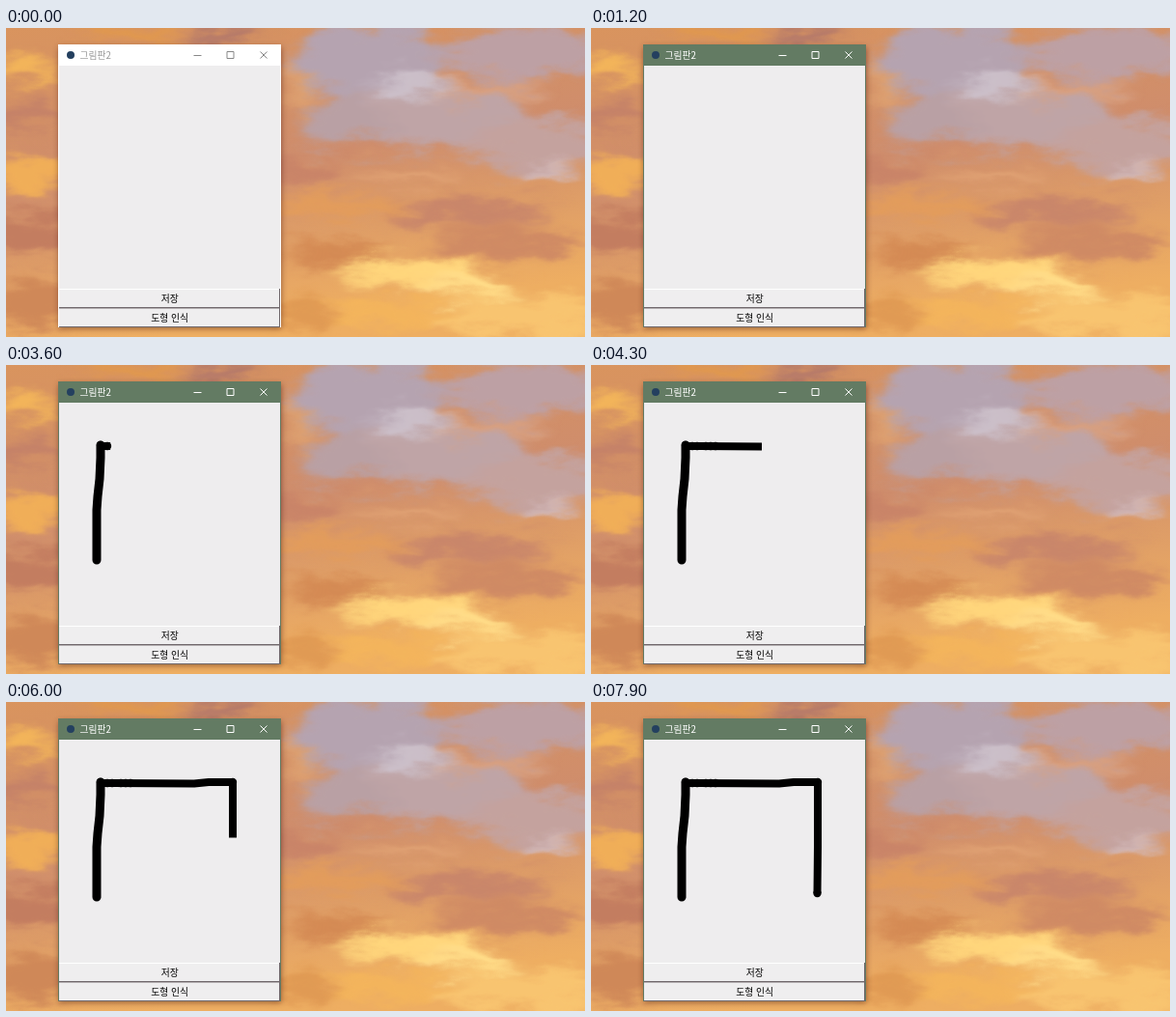
An HTML page that plays this animation: 600x320 px, repeating every 8 s.

```html
<!DOCTYPE html>
<html lang="ko">
<head>
<meta charset="utf-8">
<style>
  html, body { margin: 0; width: 100%; height: 100%; overflow: hidden; }
  svg { display: block; width: 600px; height: 320px; }
  text { font: 9.8px "Noto Sans CJK KR", "Noto Sans CJK", sans-serif; }
  .ink { fill: none; stroke: #000; stroke-linejoin: round; }
</style>
</head>
<body>
<svg viewBox="0 0 600 320">
  <defs>
    <linearGradient id="sky" x2=".25" y2="1">
      <stop offset="0" stop-color="#d9945e"/>
      <stop offset=".5" stop-color="#cf8d6c"/>
      <stop offset="1" stop-color="#eeae62"/>
    </linearGradient>
    <filter id="soft" filterUnits="userSpaceOnUse" x="-40" y="-40" width="680" height="400" color-interpolation-filters="sRGB">
      <feGaussianBlur stdDeviation="9 6" result="blur"/>
      <feTurbulence type="fractalNoise" baseFrequency=".018 .045" numOctaves="4" seed="4"/>
      <feDisplacementMap in="blur" scale="45" xChannelSelector="R" yChannelSelector="G"/>
    </filter>
    <filter id="shade" x="-10%" y="-10%" width="120%" height="120%"><feGaussianBlur stdDeviation="3"/></filter>
  </defs>
  <rect width="600" height="320" fill="url(#sky)"/>
  <g id="clouds" filter="url(#soft)"></g>

  <rect x="55" y="20" width="230" height="291" fill="#30100a" opacity=".5" filter="url(#shade)"/>
  <rect id="frame" x="54" y="17" width="231" height="293"/>
  <rect x="55" y="39" width="229" height="231" fill="#eeedee"/>
  <circle cx="67" cy="28" r="4" fill="#24405f"/>
  <g id="caption">
    <text x="76.5" y="32">그림판2</text>
    <path d="M194.5 28.5h8M229 24.5h7v7h-7zM263.5 24.5l7 7m0-7l-7 7" fill="none"/>
  </g>
  <g id="buttons" text-anchor="middle"></g>

  <g id="drawing"></g>
</svg>
<script>
const NS = 'http://www.w3.org/2000/svg';
const get = id => document.getElementById(id);

function add(parent, tag, attrs, text = '') {
  const el = parent.appendChild(document.createElementNS(NS, tag));
  for (const key in attrs) el.setAttribute(key, attrs[key]);
  el.textContent = text;
  return el;
}

// Soft cloud tones: x, y, rx, ry, colour
[
  [375, 35, 80, 42, '#b5a3b0'], [450, 90, 85, 36, '#bfa4a6'],
  [350, 100, 45, 26, '#b9a0a4'], [550, 120, 70, 26, '#c4a29e'],
  [535, 25, 85, 28, '#bda0a4'], [500, 62, 60, 9, '#d8a080'],
  [415, 60, 38, 11, '#ccc0ca'], [560, 150, 25, 6, '#d3bec2'],
  [20, 45, 30, 16, '#f2b45a'], [230, 8, 35, 9, '#b3786a'], [130, 6, 60, 9, '#e0984e'],
  [15, 92, 40, 14, '#c58268'], [25, 150, 36, 18, '#f0ae58'],
  [25, 215, 45, 24, '#c37d60'], [30, 285, 45, 24, '#cf8858'],
  [300, 65, 14, 24, '#dda070'], [310, 150, 40, 14, '#c98468'],
  [420, 152, 55, 7, '#e0a274'], [345, 185, 65, 13, '#e29c5c'],
  [480, 192, 85, 15, '#c9866a'], [340, 235, 55, 14, '#d48a54'],
  [520, 222, 75, 15, '#cf8a64'],
  [420, 252, 70, 15, '#ffd67c'], [480, 268, 55, 12, '#ffdc88'],
  [390, 295, 85, 14, '#f3b45c'], [530, 300, 85, 20, '#f8c470'],
  [310, 300, 35, 18, '#e09a54']
].forEach(([cx, cy, rx, ry, fill]) =>
  add(get('clouds'), 'ellipse', { cx, cy, rx, ry, fill }));

[['저장', 270, '#fff'], ['도형 인식', 290, '#b5b0b2']].forEach(([label, y, rim]) => {
  const g = get('buttons');
  add(g, 'rect', { x: 55, y, width: 229, height: 20, fill: '#70686c' });
  add(g, 'rect', { x: 55, y, width: 228, height: 19, fill: rim });
  add(g, 'rect', { x: 55, y: y + 1, width: 228, height: 18, fill: '#efeeef' });
  add(g, 'text', { x: 169.7, y: y + 13.9 }, label);
});

// Progress keys are [time, fraction drawn]
const strokes = [
  { points: '98,83 98,96 97,118 95,136 94,150 94,202', width: 9, cap: 'round',
    keys: [[1600, 0], [2200, .68], [2700, 1]] },
  { points: '97,84 112,84 195,84.5 210,83 236,83', width: 8, cap: 'butt',
    keys: [[3400, 0], [3600, .08], [4900, 1]] },
  { points: '235,83 235,150 234.5,198', width: 8, cap: 'butt',
    keys: [[5300, 0], [6700, 1]] }
];
for (const s of strokes)
  s.el = add(get('drawing'), 'polyline', {
    class: 'ink', points: s.points, pathLength: 1,
    'stroke-width': s.width, 'stroke-linecap': s.cap
  });

// Round blots: x, y, time of appearance
const dots = [
  [98, 83, 1600], [105, 84, 3600], [110, 84, 3700], [119, 84, 3800],
  [124, 84, 3800], [129, 84, 3900], [235, 83, 5300], [234.5, 198, 7000]
].map(([cx, cy, at]) => ({ at, el: add(get('drawing'), 'circle', { cx, cy, r: 4.2 }) }));

function progress(keys, t) {
  for (let i = 1; i < keys.length; i++) {
    const [t0, p0] = keys[i - 1], [t1, p1] = keys[i];
    if (t < t1) return p0 + (p1 - p0) * Math.max(0, (t - t0) / (t1 - t0));
  }
  return 1;
}

const show = (el, on) => el.setAttribute('visibility', on ? 'visible' : 'hidden');

function render(t) {
  const active = t >= 1000;
  const caption = get('caption');
  get('frame').setAttribute('fill', active ? '#637b63' : '#fff');
  caption.setAttribute('fill', active ? '#fff' : '#999');
  caption.lastElementChild.setAttribute('stroke', active ? '#fff' : '#888');
  for (const s of strokes) {
    show(s.el, t >= s.keys[0][0]);
    s.el.setAttribute('stroke-dasharray', `${progress(s.keys, t)} 2`);
  }
  for (const d of dots) show(d.el, t >= d.at);
}

const start = performance.now();
function tick() {
  const t = (performance.now() - start) % 8000;
  render(Math.floor(t / 100) * 100);
  requestAnimationFrame(tick);
}
tick();
</script>
</body>
</html>
```
